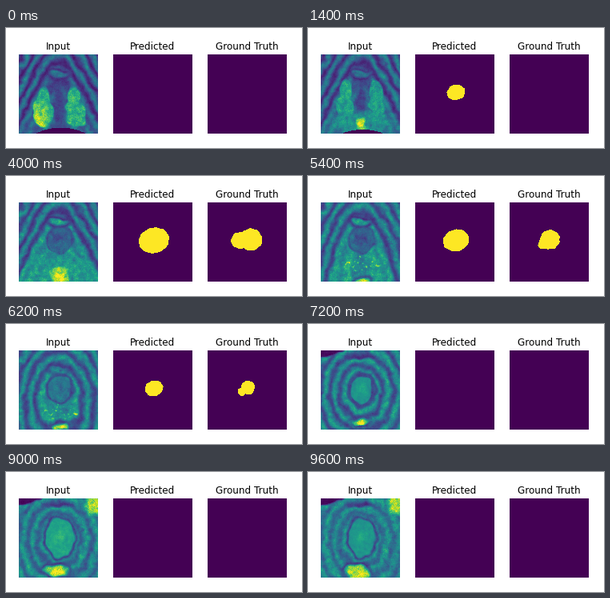
Recreate the animation shown at these times as a matplotlib script. Size 370 by 150 pixels, loop 9.8 s.

```python
import numpy as np
import matplotlib.pyplot as plt
from matplotlib.animation import FuncAnimation

W, H, SIZE = 370, 150, 99
DPI = 72
FRAMES, STEP = 49, 200
Y, X = np.mgrid[0:SIZE, 0:SIZE].astype(float)


def smooth(a, passes):
    for _ in range(passes):
        for axis in (0, 1):
            a = (np.roll(a, 1, axis) + 2 * a + np.roll(a, -1, axis)) / 4
    return a / a.std()


def texture(seed, passes):
    return smooth(np.random.default_rng(seed).normal(size=(SIZE, SIZE)), passes)


# Slightly bent coordinates keep the anatomy from looking too regular
XW, YW = X + 1.2 * texture(1, 25), Y + 1.2 * texture(2, 25)
SIDE = np.abs(XW - 50)
TISSUE, SPECKS = texture(3, 4), texture(4, 2)


def ramp(i, start, end):
    """Eased step from 0 to 1."""
    t = np.clip((i - start) / (end - start), 0, 1)
    return t * t * (3 - 2 * t)


def cover(x, y, cx, cy, rx, ry, soft=3):
    """Soft coverage of an ellipse."""
    r = np.hypot((x - cx) / rx, (y - cy) / ry)
    return np.clip((1 - r) * min(rx, ry) / soft + 0.5, 0, 1)


def paint(img, value, amount):
    img += (value - img) * amount


def muscle_layers(i):
    """Bell-shaped layers that close into ovals around the bladder."""
    bell = np.hypot(SIDE, 16) - .5 * YW
    oval = 40 * np.hypot(SIDE / 40, (YW - 52) / 48) - 16
    depth = bell + (oval - bell) * ramp(i, 22, 36)
    inside = np.clip((8 - depth) / 6, 0, 1)
    img = .25 + .17 * i / FRAMES + 0 * X
    paint(img, .2 + .22 * ramp(i, 0, 20) + .12 * YW / SIZE, inside)
    img -= (.15 - .06 * ramp(i, 41, 48)) * (1 - .55 * inside) \
        * np.cos(2 * np.pi * (depth - 24) / 13)
    return img


def add_pelvic_floor(img, i):
    low = 1 - ramp(i, 7, 14)
    rise, width = 1.2 * i, 1 - .03 * i
    paint(img, .2, low * cover(XW, YW, 50, 66, 6, 24, 4))
    fat = np.maximum(cover(SIDE, YW, 19, 56 - rise, 8, 14, 2),
                     cover(SIDE, YW, 20, 73 - rise, 13 * width, 18 * width, 2))
    paint(img, .63 - .01 * i, low * fat)
    warm = (1 - ramp(i, 0, 6)) * fat
    paint(img, .9, warm * cover(XW, YW, 22, 83, 12, 16, 14))


def add_symphysis(img, i):
    shown = 1 - ramp(i, 28, 34)
    paint(img, .14, shown * cover(XW, YW, 50, 26, 15, 8, 4))
    paint(img, .4 + .16 * ramp(i, 7, 20),
          shown * cover(XW, YW, 50, 26, 10, 4))


def add_organ(img, i):
    """The gland, then the bladder that fills above it."""
    thin, fill, shrink = ramp(i, 27, 36), ramp(i, 36, 41), ramp(i, 41, 48)
    rx = 15 - 2 * thin + 7 * fill - 3.5 * shrink
    ry = 14 + 2 * thin + 9 * fill - 2 * shrink
    rim = 2.5 + 3.5 * thin - 2.5 * fill
    shown = .85 * ramp(i, 6, 18) + .15 * thin
    body = shown * cover(XW, YW, 51, 47 + 3 * thin, rx, ry, 2)
    paint(img, .22, shown * cover(XW, YW, 51, 47 + 3 * thin, rx + rim, ry + rim))
    paint(img, .33 + .17 * thin + .16 * fill - .14 * shrink, body)
    img += (.18 * thin - .1) * shown * cover(XW, YW, 50, 47 + 3 * thin, 6, 6, 7)
    return body * thin


def add_rectum(img, i):
    keys = [7, 20, 27, 36, 41, 48]
    cy = np.interp(i, keys, [86, 90, 98, 89, 87, 92])
    rx = np.interp(i, keys, [6, 11, 8, 10, 16, 15])
    ry = np.interp(i, keys, [7, 9, 4, 2.5, 1.5, 9])
    cx = 50 - 6 * ramp(i, 41, 48)
    shown = ramp(i, 2, 7)
    paint(img, .55, .8 * shown * (1 - ramp(i, 20, 27))
          * cover(XW, YW, 50, 84, 34, 13, 8))
    paint(img, .2, ramp(i, 20, 30) * cover(XW, YW, cx, cy, rx + 5, ry + 4))
    paint(img, .72, shown * cover(XW, YW, cx, cy, rx, ry))
    paint(img, .97, shown * cover(XW, YW, cx, cy + 1, .8 * rx, .8 * ry, ry))


def add_corners(img, i):
    paint(img, .02, ramp(i, 31, 36) * cover(XW, YW + .15 * XW, 5, 1, 28, 6, 2))
    paint(img, .15, ramp(i, 31, 36) * cover(XW, YW, 50, 8, 14, 3))
    paint(img, .88, ramp(i, 36, 41) * cover(XW, YW, 95, 6, 12, 14, 9))


def scan(i):
    img = muscle_layers(i)
    add_symphysis(img, i)
    add_pelvic_floor(img, i)
    calm = 1 - .6 * add_organ(img, i)
    add_rectum(img, i)
    add_corners(img, i)

    veins = ramp(i, 20, 26) * (1 - ramp(i, 29, 36))
    img += .3 * veins * np.clip(SPECKS - 1, 0, 2) * cover(X, Y, 50, 75, 24, 11)
    flow = np.roll(TISSUE, (i, 2 * i), (0, 1))
    img += (.01 + .09 * img) * calm * (.6 * texture(100 + i, 0) + .7 * flow)

    # Curved lower limit of the field of view
    img[np.hypot(X - 52, Y - 161 - .35 * i) < 70] = 0
    return np.clip(img, 0, 1)


def swell(i, first, last):
    """Size of a rounded body cut slice by slice."""
    if not first < i < last:
        return 0
    return np.sin(np.pi * (i - first) / (last - first)) ** .35


def jagged(i):
    return X + .35 * np.sin(Y * .8 + i), Y + .35 * np.sin(X * .7 + 2 * i)


def predicted(i):
    s = swell(i, 5, 33)
    if not s:
        return 0 * X
    x, y = jagged(i)
    return cover(x, y + .08 * (x - 50), 50.5, 47.5, 19 * s, 15.5 * s) > .5


def truth(i):
    s, d = swell(i, 8, 33), ramp(i, 20, 27)
    if not s:
        return 0 * X
    x, y = jagged(i)
    main = cover(x, y, 53.5 - 3.5 * d, 46.5, 14 * s, 13.3 * s)
    lobe = cover(x, y, 41 + d, 47.5 + 4.5 * d, (12 - 4 * d) * s, (10 - 3 * d) * s)
    return np.maximum(main, lobe) > .5


SLICES = [(scan(i), predicted(i), truth(i)) for i in range(FRAMES)]

# The tiny margin guards against rounding down to one pixel less
fig = plt.figure(figsize=((W + 1e-6) / DPI, (H + 1e-6) / DPI), dpi=DPI,
                 facecolor='white')
LEFT, SIDE_PX, PITCH = 16.44, 98.23, 1.2
panels = []
for n, title in enumerate(('Input', 'Predicted', 'Ground Truth')):
    x0 = LEFT + n * PITCH * SIDE_PX
    ax = fig.add_axes([x0 / W, 18 / H, SIDE_PX / W, SIZE / H])
    ax.axis('off')
    ax.set_title(title, fontsize=12, pad=6, family='DejaVu Sans')
    panels.append(ax.imshow(SLICES[0][n], cmap='viridis', vmin=0, vmax=1,
                            interpolation='nearest', aspect='auto'))


def update(i):
    for panel, data in zip(panels, SLICES[i]):
        panel.set_data(data)
    return panels


anim = FuncAnimation(fig, update, frames=FRAMES, interval=STEP,
                     repeat=True, repeat_delay=0, blit=False)
plt.show()
```
